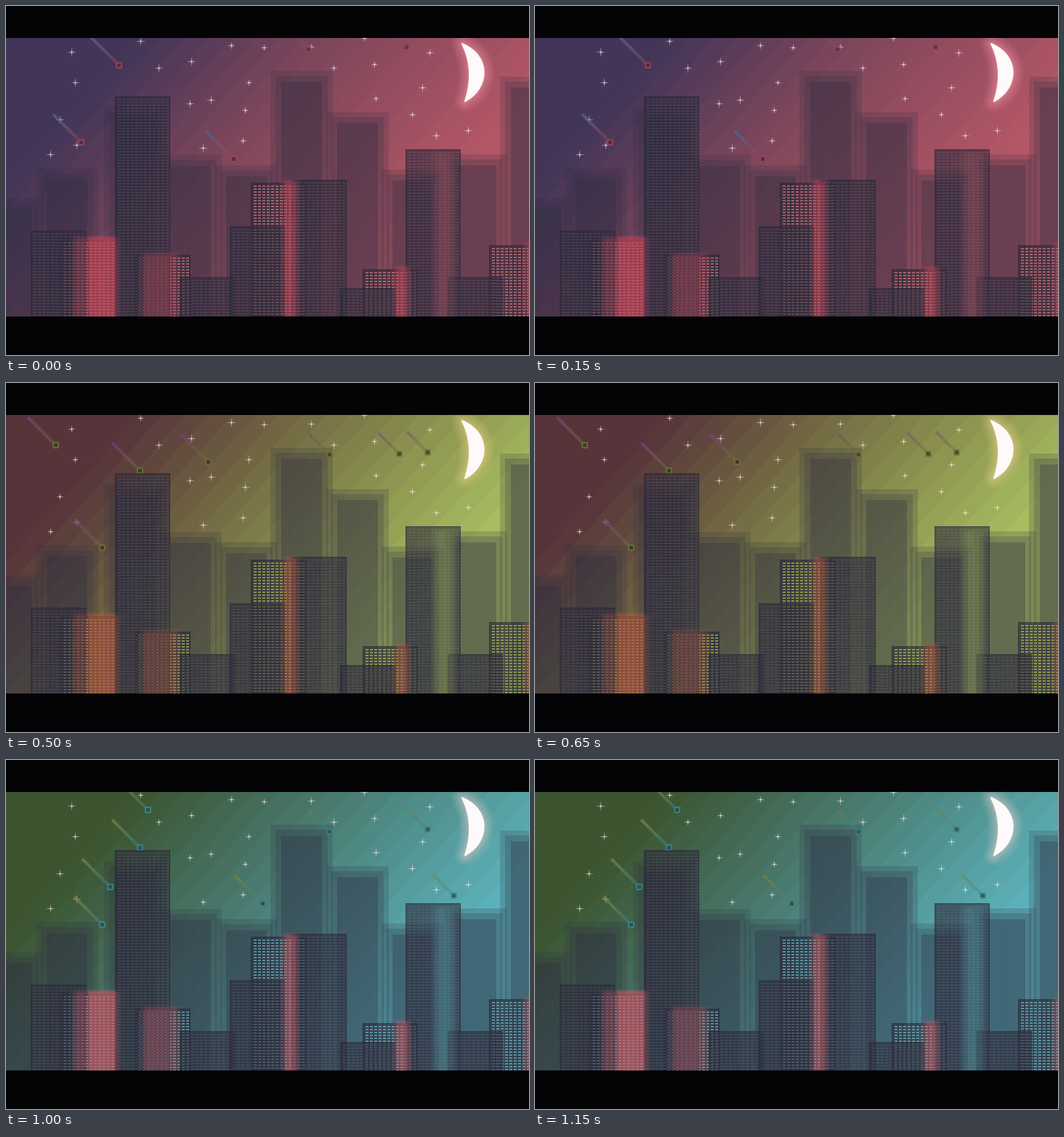
Write an HTML page with a canvas that moves like this. It is 720x480 px and loops after 1250 ms.

```html
<!DOCTYPE html>
<html lang="en">
<head>
<meta charset="utf-8">
<title>Night skyline</title>
<style>
html, body { margin: 0; width: 100%; height: 100%; overflow: hidden; background: #040406; }
canvas { display: block; width: 720px; height: 480px; }
</style>
</head>
<body>
<canvas id="stage" width="720" height="480"></canvas>
<script>
const ctx = document.getElementById('stage').getContext('2d');
const STEP = 250, TOP = 44, BOTTOM = 427;
const TOWER_WIDTH = 76, BLOCK_WIDTH = 56, BLOCK_STEP = 76.4;

// sky runs from dusk through mid to light
const scenes = [
  { dusk: '#423558', mid: '#7c465a', light: '#b85866', red: '#c8485a', win: '#e07c7c',
    glow: '#ff9cac', tail: '#4a6494', head: '#57283f', rim: '#964458' },
  { dusk: '#533555', mid: '#80503f', light: '#bb8e59', red: '#cc4a50', win: '#dca655',
    glow: '#ffae98', tail: '#4c3c98', head: '#55392f', rim: '#96683e' },
  { dusk: '#56343a', mid: '#767044', light: '#a9c060', red: '#b05540', win: '#b4c858',
    glow: '#efcf8c', tail: '#7c3a78', head: '#37382a', rim: '#6c7034' },
  { dusk: '#354c54', mid: '#5c4074', light: '#a158b8', red: '#b84470', win: '#c470cc',
    glow: '#f58cd6', tail: '#308060', head: '#452664', rim: '#73408e' },
  { dusk: '#3c5430', mid: '#48766a', light: '#5cb4bc', red: '#d05c64', win: '#70c4cc',
    glow: '#e8cccc', tail: '#7c7c3c', head: '#2a4c56', rim: '#3c8484' }
];

const stars = [
  [90, 63], [185, 48], [210, 85], [255, 76], [310, 54], [355, 57], [420, 56], [451, 85], [507, 80],
  [583, 64], [573, 112], [509, 127], [559, 149], [592, 178], [636, 171], [334, 105], [329, 143],
  [282, 129], [253, 134], [326, 185], [271, 195], [95, 105], [74, 156], [97, 191], [61, 204], [493, 44]
];

// every meteor shares one drift; the first shower stops, the second starts later
const drift = [[0, 0], [12, 22], [29, 39], [72, 101], [104, 128]];
const showers = [
  { from: 0, stop: 2, at: [[155, 81], [103, 187], [313, 210], [416, 59], [551, 56]] },
  { from: 2, stop: 4, at: [[39, 46], [249, 69], [512, 58], [91, -60]] }
];

// evenly spaced distant blocks: first left edge, then roofs
const districts = [
  { x: -20, roofs: [279, 238] },
  { x: 150, roofs: [154, 220, 234, 104, 161, 240] },
  { x: 619, roofs: [219, 112] }
];

const towers = [
  { x: 75, roof: 321, lit: true }, { x: 178, roof: 342, lit: true },
  { x: 34, roof: 309 }, { x: 150, roof: 124 }, { x: 239, roof: 373 },
  { x: 337, roof: 243, lit: true }, { x: 393, roof: 239 }, { x: 308, roof: 303 },
  { x: 491, roof: 362, lit: true }, { x: 460, roof: 388 }, { x: 550, roof: 197 },
  { x: 665, roof: 329, lit: true }, { x: 608, roof: 373 }
];

const rgb = hex => [1, 3, 5].map(i => parseInt(hex.slice(i, i + 2), 16));
const rgba = (hex, a) => `rgba(${rgb(hex)},${a})`;

function mix(from, to, k) {
  const a = rgb(from), b = rgb(to);
  return `rgb(${a.map((v, i) => Math.round(v + (b[i] - v) * k))})`;
}

function box(x, y, right, bottom, fill) {
  ctx.fillStyle = fill;
  ctx.fillRect(x, y, right - x, bottom - y);
}

function drawSky({ dusk, mid, light }) {
  const nx = 0.74, ny = 0.67, start = 165, middle = 350, end = 640, bands = 20;
  box(0, TOP, 720, BOTTOM, dusk);
  for (let i = 0; i < bands; i++) {
    const edge = start + (end - start) * i / bands;
    const s = edge + (end - start) / bands / 2;
    ctx.fillStyle = s < middle
      ? mix(dusk, mid, (s - start) / (middle - start))
      : mix(mid, light, (s - middle) / (end - middle));
    ctx.beginPath();
    ctx.moveTo((edge - ny * TOP) / nx, TOP);
    ctx.lineTo(1400, TOP);
    ctx.lineTo(1400, BOTTOM);
    ctx.lineTo((edge - ny * BOTTOM) / nx, BOTTOM);
    ctx.fill();
  }
}

function drawMoon({ glow }) {
  ctx.lineJoin = 'round';
  ctx.beginPath();
  ctx.moveTo(628, 52);
  ctx.bezierCurveTo(667, 68, 667, 112, 632, 131);
  ctx.bezierCurveTo(641, 104, 641, 78, 628, 52);
  ctx.closePath();
  for (let w = 30; w > 4; w -= 4) {
    ctx.lineWidth = w;
    ctx.strokeStyle = rgba(glow, 0.03 + 0.7 / w);
    ctx.stroke();
  }
  ctx.lineWidth = 2;
  ctx.fillStyle = ctx.strokeStyle = '#fffafa';
  ctx.fill();
  ctx.stroke();
}

function drawStar(x, y, beat) {
  const reach = Math.sin(x / 90 + beat * 2) > 0 ? 5 : 4;
  for (const [r, a] of [[reach, 0.35], [2, 0.4], [1, 0.5]]) {
    const fill = `rgba(255,240,244,${a})`;
    box(x - r, y, x + r + 1, y + 1, fill);
    box(x, y - r, x + 1, y + r + 1, fill);
  }
  for (const dx of [-2, 2])
    for (const dy of [-2, 2]) box(x + dx, y + dy, x + dx + 1, y + dy + 1, 'rgba(255,240,244,.3)');
}

function drawMeteor(x, y, { tail, rim, head }) {
  const far = x > 400, length = far ? 28 : 38;
  ctx.save();
  ctx.globalAlpha = far ? 0.7 : 0.9;
  const fade = ctx.createLinearGradient(x - length, y - length, x, y);
  fade.addColorStop(0, rgba(tail, far ? 0.6 : 0.9));
  fade.addColorStop(1, rgba(rim, 0.5));
  ctx.strokeStyle = fade;
  ctx.lineWidth = 4;
  ctx.beginPath();
  ctx.moveTo(x - length, y - length);
  ctx.lineTo(x - 2, y - 2);
  ctx.stroke();
  ctx.fillStyle = rim;
  ctx.beginPath();
  ctx.roundRect(x - 4, y - 4, 9, 9, 2);
  ctx.fill();
  box(x - 2, y - 2, x + 3, y + 3, head);
  ctx.restore();
}

const behindTower = (x, y) =>
  towers.some(t => x > t.x && x < t.x + TOWER_WIDTH && y > t.roof);

function drawMeteors(scene, beat) {
  for (const { from, stop, at } of showers) {
    if (beat < from) continue;
    const [dx, dy] = drift[Math.min(beat, stop)];
    for (const [x, y] of at)
      if (!behindTower(x + dx, y + dy)) drawMeteor(x + dx, y + dy, scene);
  }
}

function drawBlock(x, roof) {
  for (const [pad, a] of [[15, 0.2], [8, 0.22], [0, 0.28]])
    box(x - pad, roof - pad, x + BLOCK_WIDTH + pad, BOTTOM, `rgba(46,46,64,${a})`);
  for (let line = x + 2; line < x + BLOCK_WIDTH; line += 4)
    box(line, roof + 3, line + 1, BOTTOM, 'rgba(35,30,50,.06)');
}

function drawDistricts() {
  for (const { x, roofs } of districts)
    roofs.forEach((roof, i) => drawBlock(Math.round(x + i * BLOCK_STEP), roof));
}

function drawTower({ x, roof, lit }, { win }) {
  const right = x + TOWER_WIDTH;
  box(x, roof, right, BOTTOM, 'rgba(44,43,58,.62)');
  ctx.strokeStyle = 'rgba(36,34,50,.35)';
  ctx.lineWidth = 1;
  ctx.strokeRect(x + 0.5, roof + 0.5, TOWER_WIDTH - 1, BOTTOM - roof);
  ctx.fillStyle = lit ? rgba(win, 0.8) : 'rgba(160,152,166,.24)';
  for (let y = roof + 4; y < BOTTOM; y += 4)
    for (let wx = x + 4; wx < right - 3; wx += 6) ctx.fillRect(wx, y, 4, lit ? 1.5 : 1);
}

// a column of light with soft sides and a soft top
function drawGlow(left, right, roof, color, strength, soft = 10) {
  const x = left - soft, width = right - left + 2 * soft;
  const side = ctx.createLinearGradient(x, 0, x + width, 0);
  side.addColorStop(0, rgba(color, 0));
  side.addColorStop(soft / width, rgba(color, strength));
  side.addColorStop(1 - soft / width, rgba(color, strength));
  side.addColorStop(1, rgba(color, 0));
  ctx.save();
  ctx.fillStyle = side;
  ctx.fillRect(x, roof, width, BOTTOM - roof);
  for (let i = 1; i < 7; i++) {
    ctx.globalAlpha = 1 - i / 7;
    ctx.fillRect(x, roof - i, width, 1);
  }
  ctx.restore();
}

function drawGlows({ red, light }) {
  drawGlow(98, 150, 321, red, 0.32);
  drawGlow(115, 149, 321, red, 0.5, 3);
  drawGlow(194, 232, 343, red, 0.32);
  drawGlow(387, 396, 243, red, 0.5);
  drawGlow(541, 550, 362, red, 0.5);
  drawGlow(720, 730, 329, red, 0.5);
  drawGlow(597, 612, 205, light, 0.24, 14);
}

function draw(beat) {
  const scene = scenes[beat];
  drawSky(scene);
  drawMoon(scene);
  drawDistricts();
  stars.forEach(([x, y]) => drawStar(x, y, beat));
  drawMeteors(scene, beat);
  towers.forEach(tower => drawTower(tower, scene));
  drawGlows(scene);
  box(0, 0, 720, TOP, '#040406');
  box(0, BOTTOM, 720, 480, '#040406');
}

let shown = -1;
function tick() {
  const beat = Math.floor(performance.now() / STEP) % scenes.length;
  if (beat !== shown) draw(shown = beat);
  requestAnimationFrame(tick);
}
tick();
</script>
</body>
</html>
```
